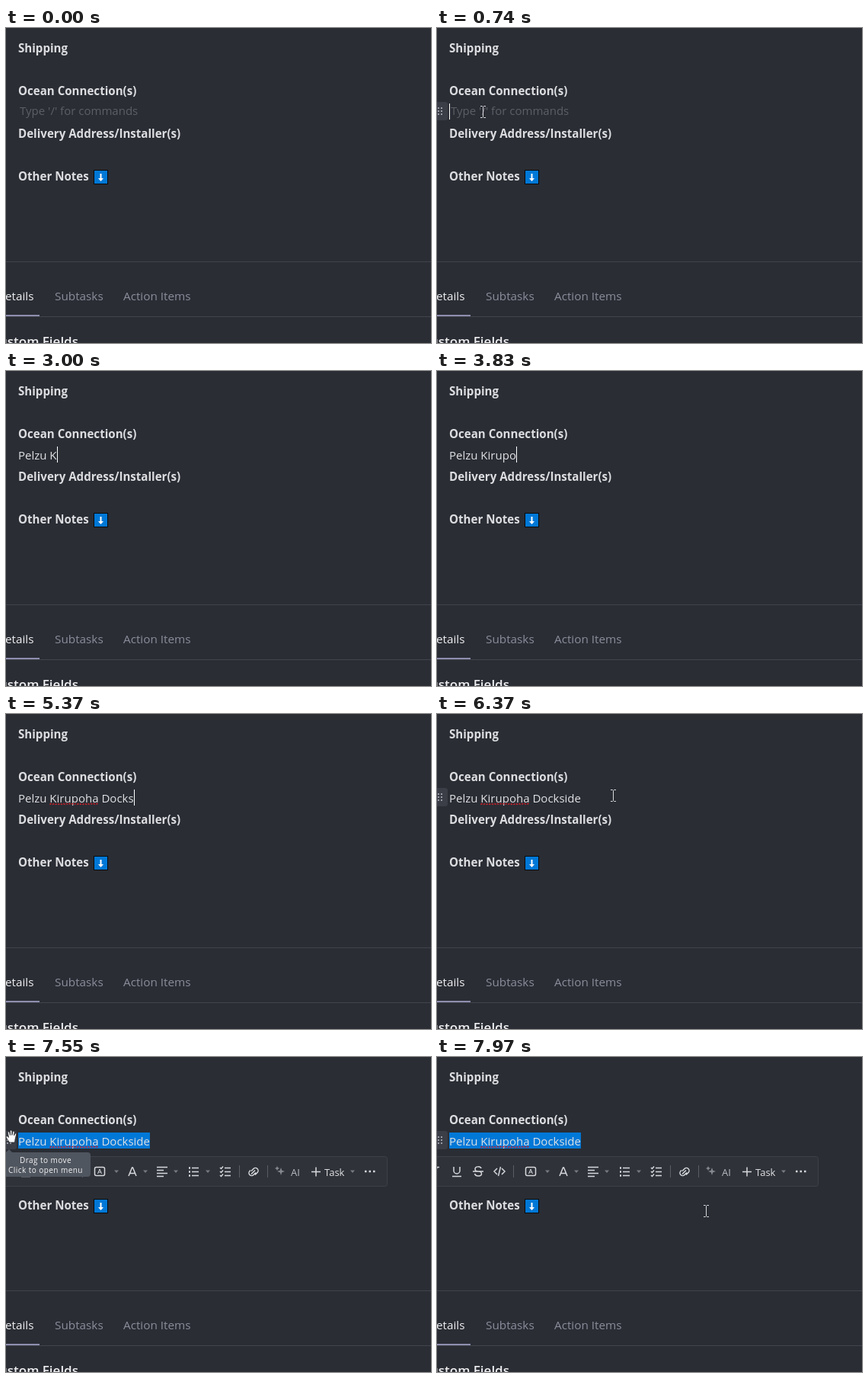
Animation, 558 px wide and 413 px high, one loop 8 s. Source, as an HTML page:

```html
<!DOCTYPE html>
<html lang="en">
<head>
<meta charset="utf-8">
<title>Note editor</title>
<style>
  html, body { margin: 0; height: 100%; overflow: hidden; background: #2a2d34; }
  svg { display: block; font: 15px "Open Sans", "Noto Sans", sans-serif; fill: #e0e1e4; }
  .heading { font-size: 15.1px; font-weight: 700; fill: #dcdde0; }
  .tab { font-size: 15.3px; fill: #8b8e9b; }
  .active { fill: #f0f0f2; }
  .line { fill: none; stroke: #d6d8dc; stroke-width: 1.5; }
  .rule { stroke: #41444c; }
  .small { font-size: 13px; }
  .tip { font-size: 10px; letter-spacing: .45px; text-anchor: middle; fill: #f2f3f4; }
  #typed { white-space: pre; }
</style>
</head>
<body>
<svg width="558" height="413" viewBox="0 0 558 413">
  <g class="heading">
    <text x="16" y="32">Shipping</text>
    <text x="16" y="88">Ocean Connection(s)</text>
    <text x="16" y="144">Delivery Address/Installer(s)</text>
    <text x="16" y="200">Other Notes</text>
  </g>
  <rect x="115.5" y="186.5" width="18" height="18" fill="#0078d7" stroke="#080a0d"/>
  <path d="M123.500 191h2v6h2.500l-3.500 4-3.500-4h2.500z" fill="#fff"/>

  <path class="rule" d="M0 306.500H558M0 378.500H558"/>
  <path d="M0 376h44v2H0z" fill="#8d8fae"/>
  <text class="tab active" x="36.500" y="357" text-anchor="end">Details</text>
  <text class="tab" x="64" y="357">Subtasks</text>
  <text class="tab" x="154" y="357">Action Items</text>
  <text class="active" x="95" y="417" text-anchor="end" font-size="17" font-weight="600">Custom Fields</text>

  <g id="grip">
    <rect x="-4" width="18" height="24" rx="3" fill="#3b3e46"/>
    <path d="M1 8h2M5 8h2M1 12h2M5 12h2M1 16h2M5 16h2" stroke="#999ca4" stroke-width="2"/>
  </g>
  <text id="placeholder" x="18" y="114" fill="#5d5f66">Type '/' for commands</text>
  <rect id="selection" y="99" height="21" fill="#0078d7"/>
  <text id="typed" x="16" y="116">Pelzu Kirupoha Dockside</text>
  <path id="squiggle" fill="none" stroke="#c8202a" stroke-width="1.500" stroke-dasharray="2.500 1.500"/>
  <rect id="caret" y="99" width="1" height="21" fill="#fff"/>

  <g id="toolbar">
    <rect x="-5" y="130.500" width="505.500" height="39" rx="3" fill="#2f3239" stroke="#3d4048"/>
    <path class="line" d="M-4 144.500H3M0 144.500L-3 156
      M22 144v5a4 4 0 0 0 8 0v-5M20 156.500h12
      M58 146c-1-3-8-3-8 1 0 2 2 3 4 3s4.500 1 4.500 3c0 4-8 4-9 0M47 150h14
      M79 146l-4 4 4 4M85 146l4 4-4 4M83.500 144l-3 12
      M161 156l4.500-11h1l4.500 11M163 152.500h6
      M198 144.500h14M198 148.500h9M198 152.500h14M198 156.500h9
      M244 145.500h9M244 150.500h9M244 155.500h9
      M287 145.500h8M287 150.500h8M287 155.500h8
      M281 145l1.500 1.500 2.500-3M281 150l1.500 1.500 2.500-3M281 155l1.500 1.500 2.500-3
      M401 150.500h12M407 144.500v12"/>
    <g class="line">
      <rect x="116.500" y="144.500" width="13" height="11" rx="2"/>
      <path d="M120.500 153l2.500-6 2.500 6M121.500 151h3" stroke-width="1"/>
      <path d="M322 149.500l3-3a3.300 3.300 0 0 1 5 5l-3 3M328 151.500l-3 3a3.300 3.300 0 0 1-5-5l1-1M322 153.500l5-5"/>
      <path d="M240 145.500h2M240 150.500h2M240 155.500h2M471 150h2.500M476.500 150h2.500M482 150h2.500" stroke-width="2.500"/>
    </g>
    <path d="M100.500 142v16M306.500 142v16M343.500 142v16" stroke="#5a5d65"/>
    <path d="M142 148.500h6l-3 3.500zM180 148.500h6l-3 3.500zM220 148.500h6l-3 3.500zM262 148.500h6l-3 3.500zM452 148.500h6l-3 3.500z" fill="#777a82"/>
    <path d="M361 145l1.300 3.700 3.700 1.300-3.700 1.300-1.300 3.700-1.300-3.700-3.700-1.300 3.700-1.300zM356 143l1 2 2 1-2 1-1 2-1-2-2-1 2-1z" fill="#85888f"/>
    <text class="small" x="374" y="156" fill="#b9bbc0">AI</text>
    <text class="small" x="418" y="156">Task</text>
  </g>
  <g id="tooltip">
    <path d="M0 125l4-4 4 4z" fill="#50565f"/>
    <rect x="-7" y="125" width="118" height="32" rx="4" fill="#50565f"/>
    <text class="tip" x="52" y="139">Drag to move</text>
    <text class="tip" x="52" y="152">Click to open menu</text>
  </g>

  <g id="mouse">
    <circle id="press" r="12" fill="#e2d117" opacity=".75"/>
    <path id="arrow" d="M0 0v16l4-3.500 2.500 6 2.500-1-2.500-6h5z" fill="#fff" stroke="#15171b" stroke-width=".7"/>
    <path id="beam" d="M-3.500-7.500h2.500l1 1 1-1h2.500M-3.500 7.500h2.500l1-1 1 1h2.500M0-6.500v13" fill="none" stroke="#d8d9db"/>
    <path id="hand" d="M-3 8l-4-6c-1-2 1-3 2-1.500l1 1-1-6c0-2 2-2 2.300 0l.7 3v-5c0-2 2-2 2.300 0v5l1-4c.4-2 2.500-1.500 2.200.5l-.5 4 1-2c.8-1.700 2.500-1 2 .8L4.500 4 4 8z" fill="#fff" stroke="#15171b" stroke-width=".7"/>
  </g>
</svg>
<script>
const LOOP = 8000, ROW = 28, FIRST_ROW = 69, EDITOR_BOTTOM = 290;
const el = Object.fromEntries([...document.querySelectorAll("[id]")].map(e => [e.id, e]));
const words = el.typed.textContent;
const edges = [...words, ""].map((_, i) => 16 + (i && el.typed.getSubStringLength(0, i)));

const keyTimes = [1410, 1530, 1640, 1760, 1940, 2270, 3000, 3220, 3420, 3560, 3690, 3830,
  3960, 4090, 4290, 4480, 4750, 4880, 5020, 5370, 5510, 5610, 5710];
const approach = [[60, 313, 304], [250, 220, 200], [450, 110, 92], [620, 60, 110]];
const drag = [[6310, 235, 113], [6480, 222, 92], [6650, 198, 106], [6790, 194, 110], [6920, 165, 110],
  [6990, 91, 109], [7130, 20, 106], [7200, 7, 104], [7700, 7, 104], [7970, 353, 202]];
const selectFrom = [[6900, 23], [6990, 18], [7130, 0]];

const within = (t, ...spans) => spans.some(([a, b]) => t >= a && t < b);
const show = (e, on) => e.style.display = on ? "" : "none";

function sample(track, t) {
  const i = track.findIndex(k => k[0] > t);
  if (i < 0) return track.at(-1).slice(1);
  if (!i) return track[0].slice(1);
  const a = track[i - 1], b = track[i], f = (t - a[0]) / (b[0] - a[0]);
  return a.slice(1).map((v, j) => v + (b[j + 1] - v) * f);
}

let d = `M${edges[6]} 118.500`;
for (let x = edges[6], up = 1; x < edges[14] - 2; x += 2, up = -up) d += `l2 ${-up}`;
el.squiggle.setAttribute("d", d);

function draw(t) {
  const count = keyTimes.filter(k => k <= t).length;
  el.typed.textContent = words.slice(0, count);
  show(el.placeholder, !count);
  show(el.squiggle, t >= 4290);
  el.caret.setAttribute("x", Math.round(edges[count]));
  show(el.caret, within(t, [690, 1220], [1410, 2800], [3000, 6040], [6790, 6920]));

  const start = edges[Math.round(sample(selectFrom, t)[0])];
  el.selection.setAttribute("x", start);
  el.selection.setAttribute("width", edges.at(-1) - start);

  // The pointer is refreshed every 70 ms.
  const tick = Math.floor((t - 60) / 70) * 70 + 60;
  const [x, y] = sample(t < 3000 ? approach : drag, tick);
  const hovering = within(t, [70, 1410], [6310, LOOP]);
  el.mouse.setAttribute("transform", `translate(${Math.round(x) + .5} ${Math.round(y)})`);
  show(el.mouse, hovering);
  show(el.press, within(t, [620, 740], [6790, 7270]));
  const shape = within(t, [7200, 7760]) ? "hand" : y > EDITOR_BOTTOM ? "arrow" : "beam";
  for (const name of ["hand", "arrow", "beam"]) show(el[name], name === shape);

  const row = t > 7200 ? 1 : Math.floor((y - FIRST_ROW) / ROW);
  el.grip.setAttribute("transform", `translate(0 ${FIRST_ROW + row * ROW})`);
  show(el.grip, hovering && row < 5);
  show(el.toolbar, t >= 7340);
  show(el.tooltip, within(t, [7480, 7760]));
}

function loop() {
  draw(performance.now() % LOOP);
  requestAnimationFrame(loop);
}
loop();
</script>
</body>
</html>
```
